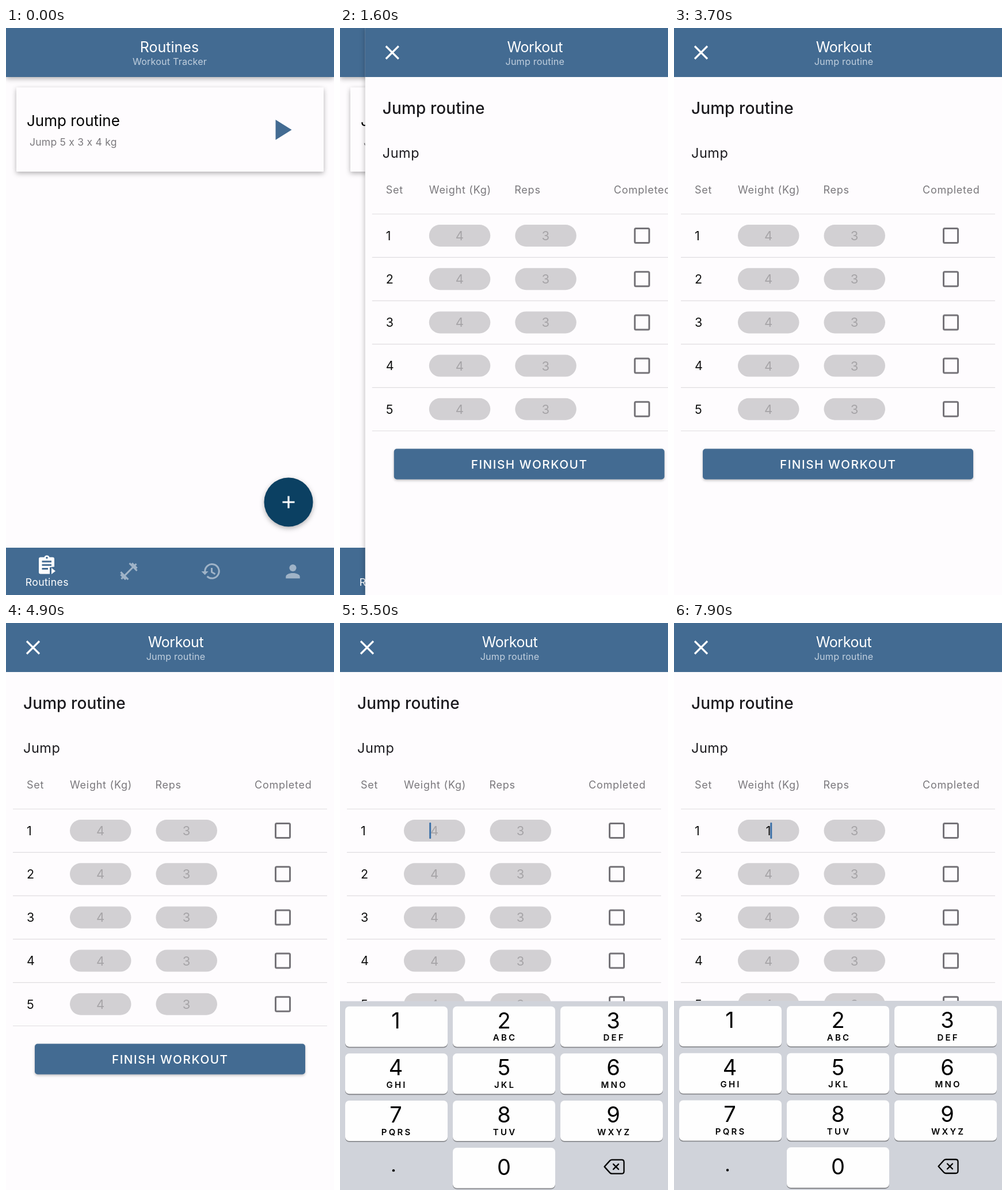
Recreate the animation shown at these times as an HTML page. Size 570x983 px, loop 8 s.

```html
<!DOCTYPE html>
<html lang="en">
<head>
<meta charset="utf-8">
<title>Workout Tracker</title>
<style>
  html, body { margin: 0; width: 100%; height: 100%; overflow: hidden; background: #fefcfe; }
  svg { display: block; width: 100vw; height: 100vh; font-family: Inter, Roboto, sans-serif; }
  .bar { fill: #436b92; }
  .page { fill: #fefcfe; }
  .shade { filter: drop-shadow(0 3px 4px rgba(0, 0, 0, .3)); }
  .mid { text-anchor: middle; }
  .h1 { font-size: 25px; fill: #fff; }
  .h2 { font-size: 16.2px; fill: #c0cfde; letter-spacing: .15px; }
  .col { font-size: 18px; fill: #79777b; letter-spacing: .75px; }
  .num { font-size: 21.5px; fill: #111; }
  .hint { font-size: 22px; fill: #a6a4a7; }
  .pill { fill: #d2d0d3; }
  .line { stroke: #dfdde0; stroke-width: 1.2; }
  .box { fill: none; stroke: #757378; stroke-width: 3; }
  .cross { fill: none; stroke: #fff; stroke-width: 3.2; }
  .tab { fill: #9fb3c7; }
  .digit { font-size: 38px; fill: #000; }
  .abc { font-size: 15px; font-weight: 600; letter-spacing: 3.2px; }
</style>
</head>
<body>
<svg viewBox="0 0 570 983" preserveAspectRatio="none">
  <g id="home">
    <rect class="page" width="570" height="983"/>
    <rect class="bar shade" width="570" height="85"/>
    <text class="h1 mid" x="284" y="42">Routines</text>
    <text class="h2 mid" x="284.5" y="64">Workout Tracker</text>
    <rect class="page shade" x="18" y="103" width="534" height="146" rx="1"/>
    <text x="36" y="169.5" font-size="26">Jump routine</text>
    <text x="41" y="204" font-size="17.6" letter-spacing=".2" fill="#7b797d">Jump 5 x 3 x 4 kg</text>
    <path class="bar" d="M468.5 159V194L496.5 176.5Z"/>
    <circle class="shade" cx="491" cy="822" r="42.5" fill="#0b4062"/>
    <path class="cross" d="M480.5 822h21M491 811.5v21"/>
    <rect class="bar" y="901" width="570" height="82"/>
    <path fill="#fff" d="M60 917.500h6.500a4.800 4.800 0 0 1 9 0H81a3 3 0 0 1 3 3V934l-8 1v11.500H60a3 3 0 0 1-3-3v-23a3 3 0 0 1 3-3ZM79 936l7 5.500-7 5.500Z"/>
    <path stroke="#436b92" stroke-width="2.800" d="M62.500 925H79M62.500 931H79M62.500 937.500H73"/>
    <circle class="bar" cx="71" cy="918.500" r="1.700"/>
    <text class="mid" x="71.300" y="967" font-size="17.700" letter-spacing=".35" fill="#fff">Routines</text>
    <path class="tab" transform="translate(231.700 923.800) scale(-1.520 1.520)" d="M20.570 14.860L22 13.430 20.570 12 17 15.570 8.430 7 12 3.430 10.570 2 9.140 3.430 7.710 2 5.570 4.140 4.140 2.710 2.710 4.140 4.140 5.570 2 7.710 3.430 9.140 2 10.570 3.430 12 7 8.430 15.570 17 12 20.570 13.430 22 14.860 20.570 16.290 22 18.430 19.860 19.860 21.290 21.290 19.860 19.860 18.430 22 16.290Z"/>
    <g fill="none" stroke="#9fb3c7" stroke-width="3">
      <path d="M345.800 942a12.200 12.200 0 1 1 3.700 8.600M357.500 936v7.200l6 3.600"/>
    </g>
    <path class="tab" d="M339.500 942h12.200l-6.100 6.200Z"/>
    <circle class="tab" cx="498.500" cy="936" r="6.100"/>
    <path class="tab" d="M486.300 954.200v-3c0-3.400 5.500-6.100 12.200-6.100s12.200 2.700 12.200 6.100v3Z"/>
  </g>

  <g id="workout">
    <rect class="page" width="570" height="983" style="filter: drop-shadow(0 0 5px rgba(0,0,0,.3))"/>
    <rect class="bar" width="570" height="85"/>
    <path class="cross" d="M36 31.500l22 22M58 31.500l-22 22"/>
    <text class="h1 mid" x="295" y="42" letter-spacing="-.4">Workout</text>
    <text class="h2 mid" x="295" y="64">Jump routine</text>
    <text x="30" y="149" font-size="28" font-weight="500" letter-spacing=".1" fill="#1c1b1f">Jump routine</text>
    <text x="30" y="225" font-size="23.500" letter-spacing=".5" fill="#1c1b1f">Jump</text>
    <g class="col">
      <text x="36" y="286.500">Set</text>
      <text x="111" y="286.500">Weight (Kg)</text>
      <text x="259.500" y="286.500">Reps</text>
      <text x="432" y="286.500">Completed</text>
    </g>
    <path class="line" d="M12 322.500H558"/>
    <g id="rows"></g>
    <rect class="bar" x="50" y="729.500" width="470" height="53" rx="5" style="filter: drop-shadow(0 2px 2px rgba(0,0,0,.25))"/>
    <text class="mid" x="285.300" y="763.500" font-size="20.700" font-weight="500" letter-spacing="1.520" fill="#fff">FINISH WORKOUT</text>
    <rect id="caret" y="346" width="3" height="28" rx="1" fill="#3b70a8"/>
  </g>

  <g id="pad">
    <rect width="570" height="340" fill="#d0d3da"/>
    <g id="keys"></g>
    <circle cx="93" cy="293.500" r="2.200"/>
    <g fill="none" stroke="#000" stroke-width="2.300" stroke-linejoin="round" stroke-linecap="round">
      <path d="M459.500 287l9.500-10.500q1.500-1.500 3.500-1.500H489.500q4 0 4 4v16q0 4-4 4H472.500q-2 0-3.500-1.500Z"/>
      <path d="M475 282.500l9 9M484 282.500l-9 9"/>
    </g>
  </g>
</svg>
<script>
const LOOP = 8000, PUSH = 1370, FOCUS = 5036, TYPED = 7450;
const $ = id => document.getElementById(id);

// Table rows
const field = (x, y, value, id = '') =>
  `<rect class="pill" x="${x}" y="${y - 19}" width="106.5" height="38" rx="19"/>
   <text ${id} class="hint mid" x="${x + 53}" y="${y + 8}">${value}</text>`;

$('rows').innerHTML = [1, 2, 3, 4, 5].map(n => {
  const y = 360 + (n - 1) * 75.2;
  return `<text class="num" x="36" y="${y + 7.8}">${n}</text>
    ${field(111, y, 4, n === 1 ? 'id="weight"' : '')}${field(260.5, y, 3)}
    <rect class="box" x="468.5" y="${y - 12.5}" width="25" height="25" rx="2"/>
    <path class="line" d="M12 ${y + 37.7}H558"/>`;
}).join('');

// Number pad
const centers = [97, 285, 475];
const letters = ['', 'ABC', 'DEF', 'GHI', 'JKL', 'MNO', 'PQRS', 'TUV', 'WXYZ'];

function key(n, col, row, label) {
  const x = 9 + col * 187, y = 9 + row * 81.7, cx = centers[col];
  return `<rect x="${x}" y="${y + 1.8}" width="178" height="70" rx="7" fill="#898a8e"/>
    <rect id="key${n}" x="${x}" y="${y}" width="178" height="70" rx="7" fill="#fefefe"/>
    <text class="digit mid" x="${cx}" y="${y + (n ? 38 : 47)}">${n}</text>
    <text class="abc mid" x="${cx + 1.6}" y="${y + 59.5}">${label}</text>`;
}
$('keys').innerHTML =
  letters.map((label, i) => key(i + 1, i % 3, Math.floor(i / 3), label)).join('') + key(0, 1, 3, '');

// Critically damped spring: 1 at rest start, falling to 0
function spring(ms) {
  const s = Math.max(0, ms) * 0.01826;
  return Math.exp(-s) * (1 + s);
}

function draw(t) {
  const slide = t < 1900 ? 570 * spring(t - PUSH) : 0;
  $('workout').setAttribute('transform', `translate(${slide} 0)`);
  $('workout').style.display = t < PUSH ? 'none' : '';

  const rise = t < 5600 ? 328 * spring(t - FOCUS) : 0;
  $('pad').setAttribute('transform', `translate(0 ${655 + rise})`);
  $('pad').style.display = t < FOCUS ? 'none' : '';

  const typed = t >= TYPED;
  $('weight').textContent = typed ? 1 : 4;
  $('weight').style.fill = typed ? '#111' : '';
  $('key1').style.fill = typed && t < TYPED + 100 ? '#b4b9c3' : '';

  const blinkOn = typed || (t - FOCUS) % 1000 < 500;
  $('caret').setAttribute('x', typed ? 167.3 : 155.2);
  $('caret').style.display = t >= FOCUS && blinkOn ? '' : 'none';
}

function tick() {
  draw(performance.now() % LOOP);
  requestAnimationFrame(tick);
}
tick();
</script>
</body>
</html>
```
